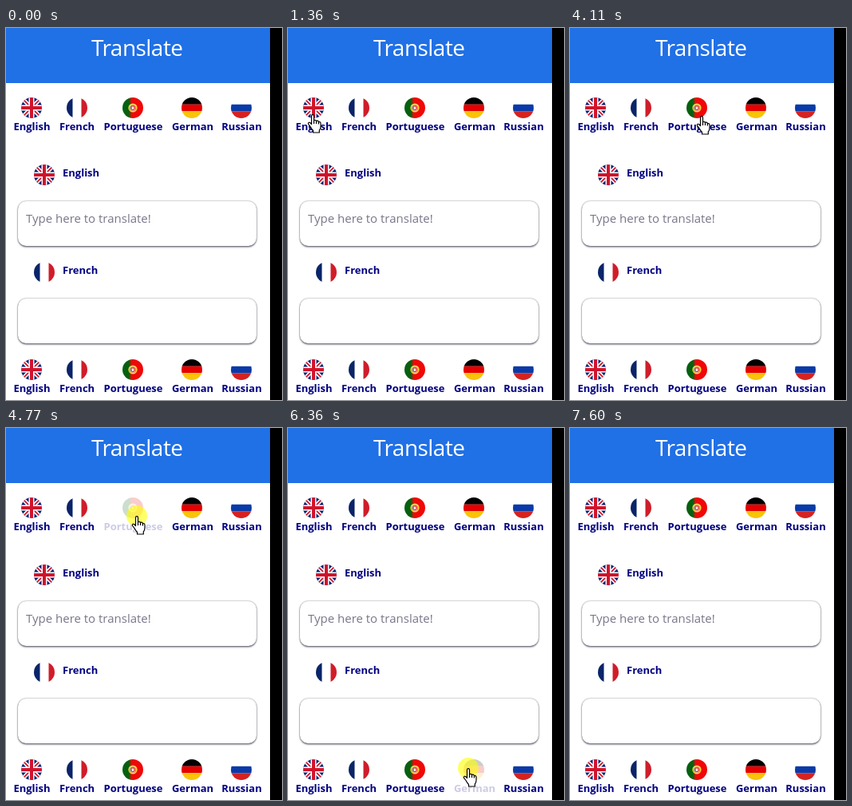
Animation, 346 px wide and 466 px high, one loop 8320 ms. Source, as an HTML page:

```html
<!DOCTYPE html>
<html lang="en">
<head>
<meta charset="utf-8">
<title>Translate</title>
<style>
  html, body { margin: 0; width: 100%; height: 100%; overflow: hidden; background: #fff; }
  svg { position: absolute; left: 0; top: 0; display: block; }
  text { font-family: "Open Sans", "Noto Sans", sans-serif; }
  .label { font-size: 13px; font-weight: 700; fill: #000080; }
  .title { font-size: 28px; letter-spacing: -.55px; fill: #fff; }
  .hint { font-size: 15px; fill: #7a758a; }
  .field {
    position: absolute; left: 15px; width: 299px; height: 56px; border-radius: 10px; background: #fff;
    box-shadow: 0 0 2px rgba(0, 0, 0, .5), 0 1.5px 2px rgba(20, 20, 50, .55);
  }
</style>
</head>
<body>
<div class="field" style="top:217px"></div>
<div class="field" style="top:339px"></div>
<svg id="stage" width="346" height="466" viewBox="0 0 346 466">
  <defs>
    <clipPath id="disc"><circle r="13"/></clipPath>
    <g id="English" clip-path="url(#disc)">
      <path d="M-13-13H13V13H-13Z" fill="#0a2270"/>
      <path d="M-13-13L13 13M13-13L-13 13" stroke="#fff" stroke-width="5"/>
      <path d="M-13-13L13 13M13-13L-13 13" stroke="#d0142c" stroke-width="1.8"/>
      <path d="M0-13V13M-13 0H13" stroke="#fff" stroke-width="7"/>
      <path d="M0-13V13M-13 0H13" stroke="#d0142c" stroke-width="4"/>
    </g>
    <g id="French" clip-path="url(#disc)">
      <path d="M-13-13H13V13H-13Z" fill="#fff"/>
      <path d="M-13-13H-5.5V13H-13Z" fill="#0a2468"/>
      <path d="M5.5-13H13V13H5.5Z" fill="#d01c2a"/>
    </g>
    <g id="Portuguese" clip-path="url(#disc)">
      <path d="M-13-13H-3V13H-13Z" fill="#066010"/>
      <path d="M-3-13H13V13H-3Z" fill="#f00808"/>
      <circle r="4.8" fill="none" stroke="#f0dc30" stroke-width="1.6"/>
      <path d="M-3-3.2H3V.5Q3 3.4 0 4Q-3 3.4-3 .5Z" fill="#e01818" stroke="#fff" stroke-width=".8"/>
      <path d="M-1.3-1.6H1.3V.8Q1.2 2 0 2.2Q-1.2 2-1.3 .8Z" fill="#fff"/>
    </g>
    <g id="German" clip-path="url(#disc)">
      <path d="M-13-13H13V-4.3H-13Z" fill="#000"/>
      <path d="M-13-4.3H13V4.3H-13Z" fill="#e60000"/>
      <path d="M-13 4.3H13V13H-13Z" fill="#fac30a"/>
    </g>
    <g id="Russian" clip-path="url(#disc)">
      <path d="M-13-13H13V-4.3H-13Z" fill="#fff"/>
      <path d="M-13-4.3H13V4.3H-13Z" fill="#0a3aa8"/>
      <path d="M-13 4.3H13V13H-13Z" fill="#d52220"/>
    </g>
  </defs>
  <rect width="331" height="69" fill="#2070e6"/>
  <rect x="331" width="15" height="466" fill="#000"/>
  <text class="title" x="107" y="35">Translate</text>
  <use href="#English" x="48" y="184"/>
  <text class="label" x="71" y="186">English</text>
  <text class="hint" x="25" y="244">Type here to translate!</text>
  <use href="#French" x="48" y="306"/>
  <text class="label" x="71" y="308">French</text>
  <g id="rows"></g>
  <circle id="glow" r="13" fill="#ff0" fill-opacity=".6"/>
  <g id="pointer" stroke-linejoin="round">
    <g id="hand" transform="translate(-6.5 0)" fill="#fff" stroke="#000" stroke-width="1.2">
      <path d="M5 2.2Q5 .7 6.5 .7Q8 .7 8 2.2V8Q8.3 7.2 9.5 7.3Q10.8 7.4 11 8.6Q11.5 8 12.5 8.2Q13.8 8.5 13.9 9.8Q14.5 9.3 15.4 9.6Q16.5 10 16.5 11.5V15Q16.5 18 14.8 20V23H7V20.5Q5 18.5 3.5 15.5L1 12.3Q.5 11 1.5 10.4Q2.6 9.9 3.6 11L5 12.5Z"/>
      <path d="M8 8V12M11 8.6V12M13.9 9.8V12.5" fill="none"/>
    </g>
    <path id="arrow" d="M.5.7V16.2L4 12.8L6.5 18.5L8.8 17.5L6.3 12H11.3Z" fill="#fff" stroke="#000"/>
    <path id="beam" d="M-3-8H-1L0-7L1-8H3M0-7V7M-3 8H-1L0 7L1 8H3" fill="none" stroke="#222"/>
  </g>
</svg>
<script>
const LOOP = 8320;
const $ = id => document.getElementById(id);

// name, centre x, left edge, right edge
const langs = [
  ["English", 32, 9, 56],
  ["French", 89, 67, 111],
  ["Portuguese", 159, 122, 197],
  ["German", 233, 208, 260],
  ["Russian", 295, 271, 320]
];
const rowTops = [87, 415];

// press time, row, item, release start, release end, release steps
const clicks = [
  [1070, 0, 0, 1140, 1360, 4],
  [2150, 0, 0, 2300, 2520, 4],
  [4260, 0, 2, 4330, 4550, 4],
  [4770, 0, 2, 4840, 5060, 4],
  [6360, 1, 3, 6510, 6650, 3],
  [6800, 1, 3, 6870, 7090, 4]
];

// start, end, steps, way points
const moves = [
  [350, 790, 6, [[185, 393], [150, 290], [75, 170], [31, 108]]],
  [2950, 3750, 11, [[32, 109], [50, 140], [125, 152], [190, 147], [171, 114]]],
  [3970, 4110, 2, [[168, 112], [165, 110]]],
  [4260, 4270, 1, [[164, 110], [164, 110]]],
  [4990, 5560, 8, [[164, 110], [172, 190], [164, 317]]],
  [5630, 6290, 9, [[168, 325], [200, 390], [226, 426]]],
  [7020, 7600, 8, [[226, 426], [245, 446], [274, 466]]]
];

const items = rowTops.map(top => langs.map(([name, x, left, right]) => {
  const g = document.createElementNS("http://www.w3.org/2000/svg", "g");
  g.innerHTML = `<use href="#${name}" x="${x}" y="${top + 13}"/>` +
    `<text class="label" text-anchor="middle" x="${(left + right) / 2}" y="${top + 41}">${name}</text>`;
  $("rows").append(g);
  return g;
}));

const clamp = v => Math.min(1, Math.max(0, v));
const ease = u => (1 - Math.cos(Math.PI * u)) / 2;
const stepped = (t, start, end, n) => Math.floor(clamp((t - start) / (end - start)) * n + .02) / n;

// Smooth curve through the way points
function along(pts, u) {
  const last = pts.length - 1;
  const i = Math.min(last - 1, Math.floor(u * last));
  const s = u * last - i;
  const at = k => pts[Math.min(last, Math.max(0, k))];
  return [0, 1].map(d => {
    const [a, b, c, e] = [at(i - 1)[d], at(i)[d], at(i + 1)[d], at(i + 2)[d]];
    return b + s / 2 * (c - a + s * (2 * a - 5 * b + 4 * c - e + s * (3 * (b - c) + e - a)));
  });
}

function pointerAt(t) {
  const move = moves.filter(m => t >= m[0]).pop() || moves[0];
  const [start, end, n, pts] = move;
  return along(pts, ease(stepped(t, start, end, n)));
}

function pointerKind(x, y) {
  const onItem = rowTops.some(top => y >= top && y <= top + 44) &&
    langs.some(([, , left, right]) => x >= left && x <= right);
  if (onItem) return "hand";
  const onField = x > 15 && x < 314 && [217, 339].some(top => y >= top && y <= top + 56);
  return onField ? "beam" : "arrow";
}

function show(id, on) {
  $(id).style.display = on ? "" : "none";
}

function draw(t) {
  const [x, y] = pointerAt(t);
  const place = `translate(${x.toFixed(1)} ${y.toFixed(1)})`;
  const kind = pointerKind(x, y);
  $("pointer").setAttribute("transform", place);
  $("glow").setAttribute("transform", place);
  show("pointer", t >= 350 && t < 7600);
  for (const id of ["hand", "arrow", "beam"]) show(id, id === kind);

  items.flat().forEach(g => g.setAttribute("opacity", 1));
  let glow = false;
  for (const [press, row, i, from, to, n] of clicks) {
    if (t < press || t >= to) continue;
    glow = t < from;
    const u = glow ? 0 : (Math.floor((t - from) / (to - from) * (n - 1) + .02) + 1) / n;
    items[row][i].setAttribute("opacity", .2 + .8 * ease(u));
  }
  show("glow", glow);
}

const begin = performance.now();
function tick() {
  draw((performance.now() - begin) % LOOP);
  requestAnimationFrame(tick);
}
tick();
</script>
</body>
</html>
```
